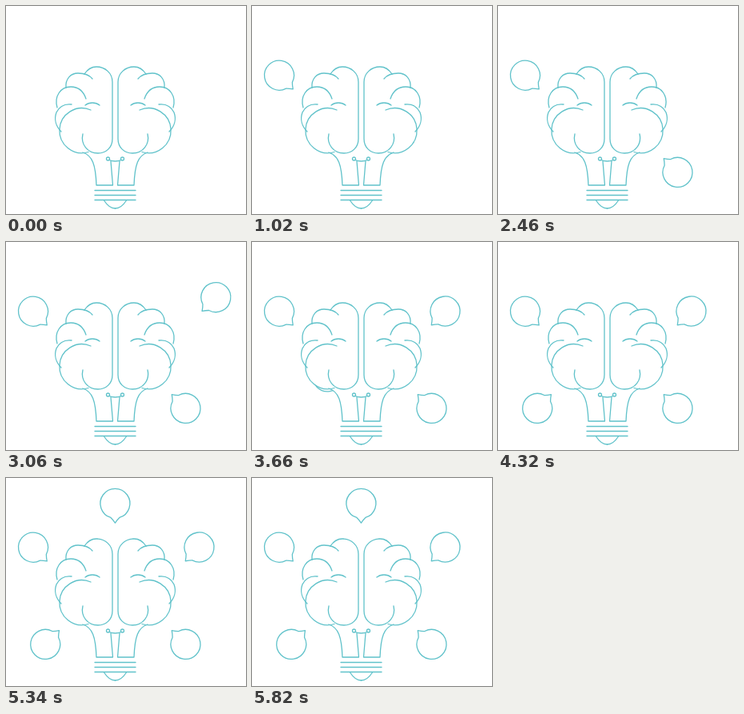
Write an HTML page that moves like this. It is 300 px wide and 260 px high and loops after 6 s.

```html
<!DOCTYPE html>
<html lang="en">
<head>
<meta charset="utf-8">
<title>Brain bulb ideas</title>
<style>
  html, body { margin: 0; width: 100%; height: 100%; overflow: hidden; background: #fff; }
  svg { display: block; width: 300px; height: 260px; }
  .line { fill: none; stroke: #60c2ca; stroke-width: 1.3; stroke-linecap: round; stroke-linejoin: round; }
  .mask { fill: #fff; }
</style>
</head>
<body>
<svg viewBox="0 0 300 260">
  <defs>
    <g id="half">
      <path class="mask" d="M137 84H131C126 75 108 71 98 85C85 82 74 90 75 102C63 106 60 118 64 127C60 137 61 149 69 157C69 174 81 184 97 183C108 187 112 198 113 224H137Z"/>
      <g class="line">
        <path d="M98 85C102 79 107 76 113 76C124 76 133 84 133 95V166C133 177 125 184 115 184C102 184 93 173 96 160"/>
        <path d="M75 102C74 91 81 84 90 84C98 84 104 86 108 91"/>
        <path d="M64 127C60 113 68 101 81 101C91 101 97 107 100 116"/>
        <path d="M82 123C74 122 67 125 63 133C60 141 62 150 69 157"/>
        <path d="M106 130A28 28 0 1 0 103 182.500"/>
        <path d="M99 124C104 120 112 120 117 124"/>
        <path d="M96 183C108 187 112 198 113 224H133.500L131 194"/>
        <circle cx="127.500" cy="191" r="2"/>
        <path d="M129 192.500Q132 194 136.500 194"/>
        <path d="M122.500 243C127 250 132 253 136.500 253"/>
      </g>
    </g>
  </defs>
  <g id="bubbles" class="line"></g>
  <use href="#half"/>
  <use href="#half" transform="translate(273 0) scale(-1 1)"/>
  <path class="line" d="M111 230.500H162M111 236.500H162M111 242.500H162"/>
</svg>
<script>
const LOOP = 6000;
const REACH = 85; // distance from the hiding place behind the brain to rest

// x, y: resting centre; over: overshoot past it; times in ms
const bubbles = [
  { x: 34, y: 86.7, over: [-5, -4.5], launch: 0, peak: 540, settle: 800 },
  { x: 224.5, y: 207.9, over: [13, 12], launch: 900, peak: 2010, settle: 2340 },
  { x: 241.5, y: 86.5, over: [30, -25], launch: 2460, peak: 3200, settle: 3300 },
  { x: 49.2, y: 207.9, over: [-16, 14], launch: 3560, peak: 4140, settle: 4300 },
  { x: 136.4, y: 31.8, over: [0, -4.5], launch: 4500, peak: 5130, settle: 5330 }
];

const progress = (t, from, to) => Math.min(1, Math.max(0, (t - from) / (to - from)));

// Distance from rest, positive outwards: shoot past, then swing back.
function distance(t, b) {
  if (t < b.peak) {
    const left = (1 - progress(t, b.launch, b.peak)) ** 1.4;
    return b.size - (REACH + b.size) * left;
  }
  return b.size * (1 + Math.cos(Math.PI * progress(t, b.peak, b.settle))) / 2;
}

function bubblePath(r, tip, spread) {
  const x = r * Math.cos(spread), y = r * Math.sin(spread);
  return `M${x} ${y}A${r} ${r} 0 1 1 ${x} ${-y}Q${r + 1.5} -3 ${tip} 0Q${r + 1.5} 3 ${x} ${y}Z`;
}

const layer = document.getElementById("bubbles");
const outline = bubblePath(18.5, 24.4, 0.3);

for (const b of bubbles) {
  const [dx, dy] = b.over;
  b.size = Math.hypot(dx, dy);
  b.ux = dx / b.size;
  b.uy = dy / b.size;
  // Tails point inwards, snapped to the nearest eighth of a turn.
  b.tail = Math.round(Math.atan2(-dy, -dx) / (Math.PI / 4)) * 45;
  b.el = document.createElementNS("http://www.w3.org/2000/svg", "path");
  b.el.setAttribute("d", outline);
  layer.append(b.el);
}

function draw(now) {
  const t = now % LOOP;
  for (const b of bubbles) {
    const s = distance(t, b);
    b.el.setAttribute("transform",
      `translate(${b.x + b.ux * s} ${b.y + b.uy * s}) rotate(${b.tail})`);
  }
}

const start = performance.now();
function tick() {
  draw(performance.now() - start);
  requestAnimationFrame(tick);
}
tick();
</script>
</body>
</html>
```
